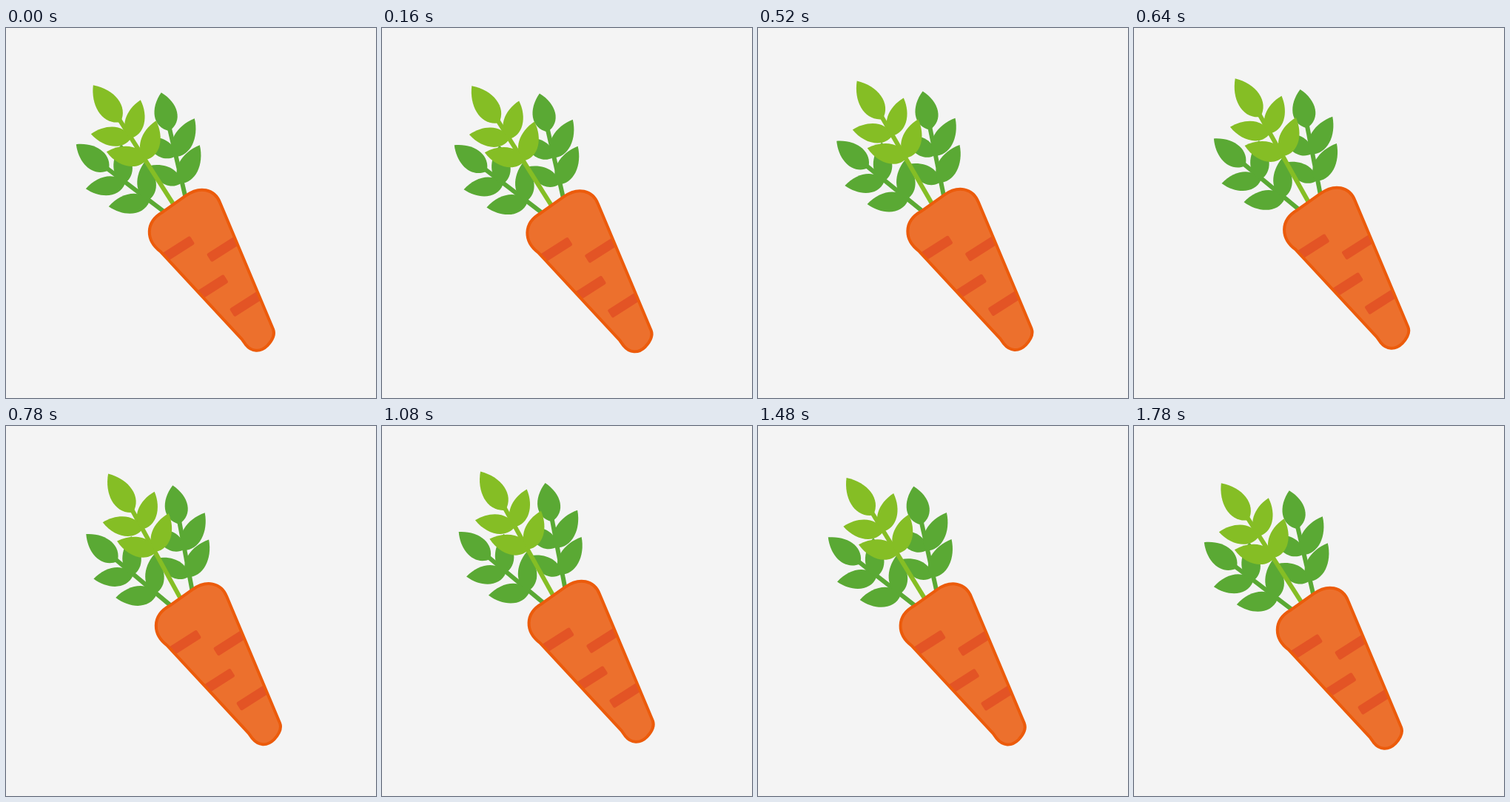
Animation, 500 px wide and 500 px high, one loop 1.82 s. Source, as an HTML page:

```html
<!DOCTYPE html>
<html lang="en">
<head>
<meta charset="utf-8">
<title>Swaying carrot</title>
<style>
  html, body { margin: 0; width: 100%; height: 100%; overflow: hidden; background: #f4f4f4; }
  svg { display: block; width: 100%; height: 100%; }
  .dark { fill: #5aa934; stroke: #5aa934; }
  .light { fill: #85be25; stroke: #85be25; }
  .leaf { stroke: none; }
  .stem { stroke-width: 6; }
</style>
</head>
<body>
<svg viewBox="0 0 500 500">
  <defs>
    <path id="root" d="M212 248.5 L243 226.500 C262 213 282 217 289.500 236 L361.300 407
      C364 414 360 422 353.500 429 C344 438.500 332 437.500 324 427.500 L319 420.500
      L209 302 C189 287 188 262 212 248.500 Z"/>
    <clipPath id="inside"><use href="#root"/></clipPath>
  </defs>
  <g id="carrot">
    <g id="tops"></g>
    <use href="#root" fill="#ec702d"/>
    <g id="stripes" fill="#e35425" clip-path="url(#inside)"></g>
    <use href="#root" fill="none" stroke="#ec5b0b" stroke-width="4" stroke-linejoin="round"/>
  </g>
</svg>
<script>
const STEP = 20, LOOP = 1820, CYCLE = 1780;
const RADIUS = 5.4, START = -47 * Math.PI / 180;
const $ = id => document.getElementById(id);

function add(parent, tag, attrs) {
  const el = document.createElementNS('http://www.w3.org/2000/svg', tag);
  for (const key in attrs) el.setAttribute(key, attrs[key]);
  return parent.appendChild(el);
}

// Pointed leaf from tip to base; w sets the bulge relative to its length.
function leaf(parent, [tx, ty, bx, by, w]) {
  const dx = bx - tx, dy = by - ty;
  const at = (u, v) => `${tx + dx * u - dy * v} ${ty + dy * u + dx * v}`;
  const d = `M${at(0, 0)} C${at(.34, w * .95)} ${at(.82, w * 1.05)} ${at(1, 0)}
    C${at(.82, -w * 1.05)} ${at(.34, -w * .95)} ${at(0, 0)}Z`;
  add(parent, 'path', { d, class: 'leaf' });
}

// stem: foot x, y, top x, y; the foot is also the pivot of the sway
const sprigs = [
  { tone: 'dark', sway: 2.8, stem: [215, 249, 136, 189], leaves: [
    [95, 157, 139, 192, .35], [108, 217, 161, 210, .32], [156, 157, 160, 210, .32],
    [139, 241, 194, 234, .32], [188, 180, 192, 233, .32]] },
  { tone: 'dark', sway: 2.6, stem: [244, 234, 221, 135], leaves: [
    [210, 87, 221, 139, .385], [187, 148, 229, 173, .32], [255, 122, 228, 174, .31],
    [194, 186, 236, 210, .32], [262, 158, 235, 210, .31]] },
  { tone: 'light', sway: 4, stem: [229, 242, 153, 123], leaves: [
    [118, 77, 155, 127, .335], [115, 143, 169, 149, .32], [182, 97, 168, 149, .32],
    [136, 167, 190, 178, .32], [203, 125, 189, 178, .32]] }
];

for (const s of sprigs) {
  const [x1, y1, x2, y2] = s.stem;
  s.el = add($('tops'), 'g', { class: s.tone });
  add(s.el, 'line', { x1, y1, x2, y2, class: 'stem' });
  s.leaves.forEach(l => leaf(s.el, l));
}

// Free end of each stripe and the side it extends to
for (const [x, y, side] of [[252, 286, -1], [274.5, 311, 1], [297.5, 338, -1], [305.5, 385, 1]]) {
  add($('stripes'), 'rect', {
    x: side < 0 ? -52 : 0, y: -6.5, width: 52, height: 13, rx: 2.5,
    transform: `translate(${x} ${y}) rotate(-32.5)`
  });
}

function draw(ms) {
  const t = Math.min(Math.floor(ms % LOOP / STEP) * STEP, CYCLE);
  const turn = 2 * Math.PI * t / CYCLE;
  const x = 3.75 + RADIUS * Math.sin(START + turn);
  const y = -3.5 + RADIUS * Math.cos(START + turn);
  $('carrot').setAttribute('transform', `translate(${x} ${y})`);
  const lean = (1 - Math.cos(turn)) / 2;
  for (const s of sprigs) {
    s.el.setAttribute('transform', `rotate(${s.sway * lean} ${s.stem[0]} ${s.stem[1]})`);
  }
}

const begin = performance.now();
function tick() {
  draw(performance.now() - begin);
  requestAnimationFrame(tick);
}
draw(0);
requestAnimationFrame(tick);
</script>
</body>
</html>
```
